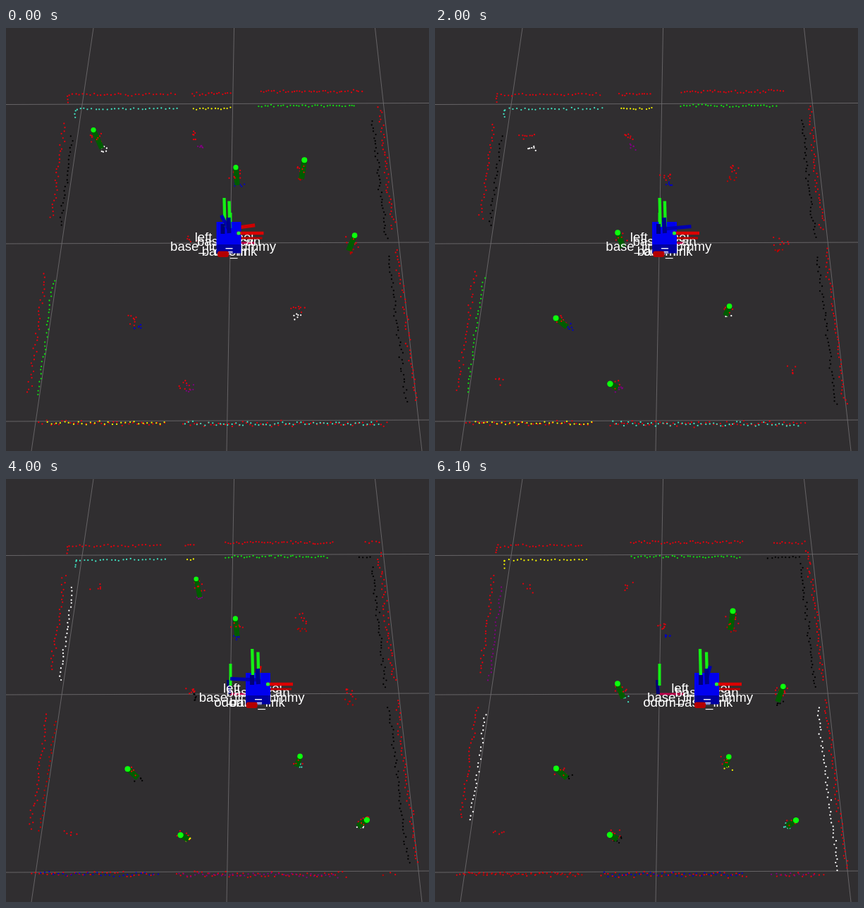
These frames come from a looping animation (600x600 px, 6200 ms). An HTML page with a canvas:

```html
<!DOCTYPE html>
<html>
<head>
<meta charset="utf-8">
<style>
html, body { margin: 0; height: 100%; overflow: hidden; background: #302e30; }
canvas { display: block; }
</style>
</head>
<body>
<canvas id="stage" width="600" height="600"></canvas>
<script>
const ctx = document.getElementById('stage').getContext('2d');
const STEP = 100, STEPS = 62;
const RED = '#e6000c', BLUE = '#0000f0', GREEN = '#14f014';
const COLORS = { c: '#40e0c0', y: '#f0f000', g: '#10e010', k: '#000', w: '#fff', m: '#800080', b: '#0000c8', r: '#c00000' };

// Key steps with the robot's shift and its wheel angle.
const KEYS = [0, 11, 20, 31, 40, 46, 61];
const SHIFT = [0, 3.5, 9.5, 25.5, 41.5, 53.5, 69.5];
const WHEEL = [-15, 17, 80, 182, 275, 360, 368];

// Walls: x0, y0, x1, y1, slide of each end along the wall, spacing, jitter, colours at each key.
const WALLS = [
  [89, 95, 242, 94, 0, -32, 5, 1.6, 'c c c c c m y'],
  [88, 97, 87, 108, 0, 0, 4, 1, 'c c c c c m y'],
  [263, 94, 320, 93, -15, -88, 4, 2, 'y y y y y - -'],
  [361, 90, 505, 90, -84, -66, 4, 1.8, 'g g g g g g g'],
  [556, 89, 529, 90, -76, 0, 4.5, 1.6, 'k k k k k k k'],
  [83, 136, 65, 270, 0, 7, 5, 2.5, 'k kw k k w c m'],
  [56, 349, 31, 522, -26, -40, 5.3, 2.8, 'g gr g g r k w'],
  [530, 113, 550, 288, -12, 0, 4.2, 3, 'k k k k k k k'],
  [554, 314, 581, 530, 0, 26, 4.8, 3, 'k kw k k k k w'],
  [46, 560, 226, 561, -16, -18, 5.6, 3, 'y by y y b g r'],
  [251, 561, 541, 562, -15, -97, 5, 3.6, 'c cmb c c m y b'],
  [635, 561, 552, 561, -150, 0, 6, 2.5, 'r r r r r c m']
];

// Pillars: top, foot, radius, detected at each key, cluster colours ('.' bare hits, '-' none).
const PILLARS = [
  [124, 144, 136, 171, 3.6, '1101000', 'wwww...'],
  [270, 142, 275, 168, 3.3, '0101100', 'mmmmmy.'],
  [326, 198, 328, 223, 3.6, '1000110', 'bbbbbbb'],
  [423, 187, 419, 214, 4, '1001011', 'rrrrrrr'],
  [494, 294, 486, 316, 3.8, '1101001', 'rrrrrrk'],
  [259, 290, 267, 311, 3.9, '0011001', '..kgkwc'],
  [172, 411, 187, 424, 4, '0111111', 'bbbbkrk'],
  [248, 505, 259, 511, 4.2, '0111111', 'mymmybk'],
  [417, 394, 412, 408, 3.8, '0010111', 'wcwwcmy'],
  [512, 484, 499, 493, 4.2, '0000111', '--..wwc'],
  [90, 502, 92, 504, 3, '0000000', '--.....']
];

const mix = (a, b, t) => a + (b - a) * t;
// Scan height down to the floor, as seen by the camera.
const toFloor = (x, y) => [mix(x, 319, .047), mix(y, 562, .043)];

let seed = 1;
function random() {
  seed = seed + 0x6d2b79f5 | 0;
  let v = Math.imul(seed ^ seed >>> 15, 1 | seed);
  v ^= v + Math.imul(v ^ v >>> 7, 61 | v);
  return ((v ^ v >>> 14) >>> 0) / 4294967296;
}
const jitter = amount => (random() + random() - 1) * 1.5 * amount;
const hash = (a, b) => { const v = Math.sin(a * 127.1 + b * 311.7) * 43758.5453; return v - Math.floor(v); };

function dot(x, y, color, r = 1.15) {
  ctx.fillStyle = color;
  ctx.beginPath();
  ctx.arc(x, y, r, 0, 7);
  ctx.fill();
}

function bar(x0, y0, x1, y1, color, width) {
  ctx.strokeStyle = color;
  ctx.lineWidth = width;
  ctx.beginPath();
  ctx.moveTo(x0, y0);
  ctx.lineTo(x1, y1);
  ctx.stroke();
}

function rect(x, y, w, h, color) {
  ctx.fillStyle = color;
  ctx.fillRect(x, y, w, h);
}

function label(text, x, y) {
  ctx.fillStyle = '#fff';
  ctx.fillText(text, x, y);
}

function drawGrid() {
  rect(0, 0, 600, 600, '#302e30');
  for (const [a, b] of [[124, 36], [323.5, 313], [523.5, 590]]) bar(a, 0, b, 600, '#747274', .8);
  for (const y of [108.5, 306, 558]) bar(0, y, 600, y - 2, '#747274', .8);
}

function drawWall([x0, y0, x1, y1, slide0, slide1, gap, spread, colors], key, s) {
  const full = Math.hypot(x1 - x0, y1 - y0);
  // Walls not yet seen are listed with crossed ends, so their direction is flipped.
  const flip = x0 > x1 && Math.abs(y1 - y0) < 5 ? -1 : 1;
  const ux = flip * (x1 - x0) / full, uy = flip * (y1 - y0) / full;
  const ax = x0 + ux * slide0 * s, ay = y0 + uy * slide0 * s;
  const length = (x1 + ux * slide1 * s - ax) * ux + (y1 + uy * slide1 * s - ay) * uy;
  const kinds = colors.split(' ')[key];
  for (const onFloor of [false, true]) {
    if (onFloor && kinds === '-') continue;
    for (let d = 0; d <= length; d += gap * (onFloor ? 1.15 : 1)) {
      const along = d + jitter(1), off = jitter(spread * (onFloor ? .8 : 1));
      const p = [ax + ux * along - uy * off, ay + uy * along + ux * off];
      if (onFloor) dot(...toFloor(...p), COLORS[kinds[Math.floor(random() * kinds.length)]]);
      else dot(...p, RED);
    }
  }
}

function drawPillar([x, y, fx, fy, r, seen, colors], index, step, part, t) {
  const kind = colors[t < .5 ? part : part + 1];
  const cx = (x + fx) / 2, cy = (y + fy) / 2 - 2;
  const hits = count => {
    for (let i = 0; i < count; i++) dot(cx + jitter(8), cy + jitter(6), RED);
  };
  if (kind !== '-') hits(kind === '.' ? 5 : 8);
  if (COLORS[kind])
    for (let i = 0; i < 6; i++) dot(fx + 2 + jitter(6), fy + jitter(4), COLORS[kind]);
  if (hash(index + 1, Math.floor(step / 3) + 1) < mix(+seen[part], +seen[part + 1], t)) {
    const jx = jitter(.6), jy = jitter(.6);
    bar(x + jx, y + jy, fx, fy, '#005c00', r * 2);
    hits(3);
    dot(x + jx, y + jy, '#0cff0c', r);
  }
}

function drawOdom() {
  bar(318, 305, 353, 305, '#c0004c', 3);
  bar(316.5, 305, 315.5, 285, '#000078', 5);
  bar(318.5, 293, 318.5, 262, GREEN, 4);
}

function drawRobot(shift, angle) {
  const s = shift / 69.5, a = angle * Math.PI / 180;
  const x = 298.5 + shift, lean = 3 * s;
  // Wheel axes pointing below the horizon stay out of sight.
  const spin = (turn, color) => {
    const up = Math.cos(turn);
    if (up > -.1) bar(x + 17, 285, x + 17 + 39 * Math.sin(turn), 285 - 20 * Math.max(0, up), color, 5);
  };

  label('odom', 318.5, 323);
  label('left_wheel', x + 11 - 2 * s, 302.5);
  label('base_scan', x + 17.5, 309);
  label('base_link_dummy', x + 9.5 - 1.5 * s, 316);
  label('base_link', x + 18.5 - 3.5 * s, 323);

  bar(x + 30, 298, x + 65, 298, '#b80000', 3);
  spin(a + Math.PI / 2, '#d00000');
  rect(x, 275, 35, 32, BLUE);
  rect(x, 307, 35, 12.5, '#0000a0');
  bar(x + 12 - lean, 282, x + 11 - lean, 241, GREEN, 4.3);
  bar(x + 19 - lean / 3, 284, x + 18 - lean / 3, 245.5, GREEN, 4.3);
  spin(a, '#0000b0');
  bar(x + 9, 292, x + 9, 278, '#000078', 6);
  bar(x + 18, 291, x + 17, 269, '#00008c', 6);
  bar(x + 29, 291, x + 67, 291, '#dc0000', 4.4);
  dot(x + 31.5, 291, '#20f040', 2.6);
  rect(x + 13, 312, 10, 1.4, '#fff');
  rect(x + 13, 317, 10, 1.4, '#fff');
  ctx.fillStyle = '#b40000';
  ctx.beginPath();
  ctx.roundRect(x + 1.5 - lean / 2, 316.5, 16, 8.5, 3);
  ctx.fill();
}

function draw(step) {
  let part = 0;
  while (part < KEYS.length - 2 && step >= KEYS[part + 1]) part++;
  const t = (step - KEYS[part]) / (KEYS[part + 1] - KEYS[part]);
  const shift = mix(SHIFT[part], SHIFT[part + 1], t);
  const key = t < .5 ? part : part + 1;

  seed = (step + 1) * 7919;
  drawGrid();
  WALLS.forEach(wall => drawWall(wall, key, shift / 69.5));
  PILLARS.forEach((pillar, i) => drawPillar(pillar, i, step, part, t));
  drawOdom();
  drawRobot(shift, mix(WHEEL[part], WHEEL[part + 1], t));
}

ctx.font = '18.6px "Liberation Sans", Arial, sans-serif';
ctx.textAlign = 'center';
const start = performance.now();
function tick() {
  draw(Math.floor((performance.now() - start) / STEP) % STEPS);
  requestAnimationFrame(tick);
}
tick();
</script>
</body>
</html>
```
